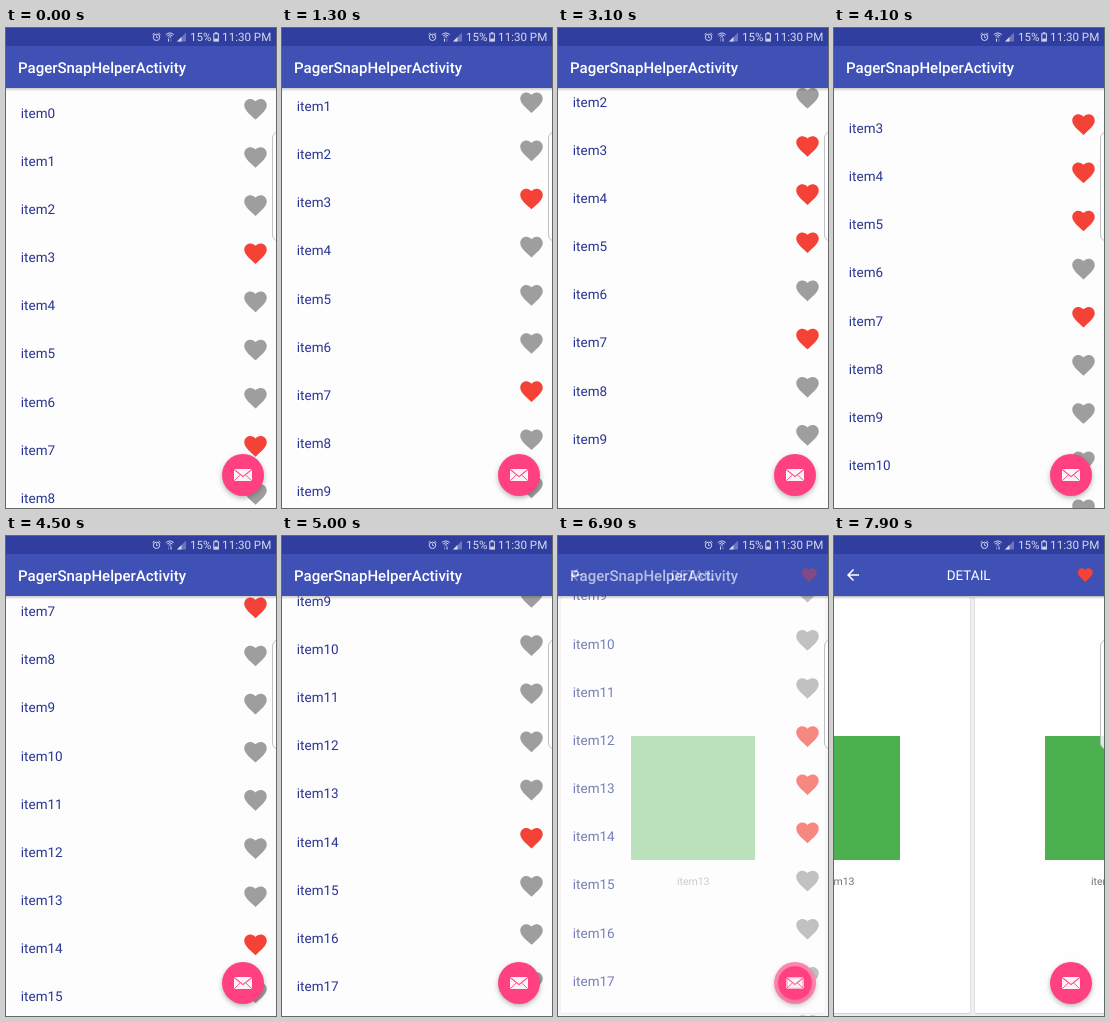
Animation, 270 px wide and 480 px high, one loop 8000 ms. Source, as an HTML page with a canvas:

```html
<!DOCTYPE html>
<html lang="en">
<head>
<meta charset="utf-8">
<title>Pager list</title>
<style>
  html, body { margin: 0; width: 100%; height: 100%; overflow: hidden; background: #fdfdfd; }
  canvas { position: absolute; left: 0; top: 0; width: 100vw; height: 100vh; }
</style>
</head>
<body>
<canvas id="list"></canvas>
<canvas id="detail"></canvas>
<script>
const W = 270, H = 480, LOOP = 8000, STEP = 100;
const ROW = 48.15, HEADER = 60, PAGE = 269;
const PRIMARY = '#3f51b5', DARK = '#303f9f', PINK = '#ff4081';
const RED = '#f44336', GRAY = '#9e9e9e', GREEN = '#4caf50', PAPER = '#fdfdfd';
const HEART = new Path2D('M12 21.35l-1.45-1.32C5.4 15.36 2 12.28 2 8.5 2 5.42 4.42 3 7.5 3c1.74 0 3.41.81 4.5 2.09C13.09 3.81 14.76 3 16.5 3 19.58 3 22 5.42 22 8.5c0 3.78-3.4 6.86-8.55 11.54z');
const ARROW = new Path2D('M20 11H7.83l5.59-5.59L12 4l-8 8 8 8 1.41-1.41L7.83 13H20z');

// Item index -> time it becomes a favourite
const liked = { 3: 0, 7: 0, 14: 0, 5: 2400, 4: 3000, 12: 5700, 13: 6100 };
const wifiFlips = [1500, 3300, 4300, 6600, 7600];

const clamp = v => Math.max(0, Math.min(1, v));
const ramp = (t, from, to) => clamp((t - from) / (to - from));
const easeOut = (u, p) => 1 - Math.pow(1 - u, p);
const easeInOut = u => u * u * (3 - 2 * u);

function layer(id) {
  const canvas = document.getElementById(id);
  const dpr = window.devicePixelRatio || 1;
  canvas.width = Math.round((innerWidth || W) * dpr);
  canvas.height = Math.round((innerHeight || H) * dpr);
  const c = canvas.getContext('2d');
  c.scale(canvas.width / W, canvas.height / H);
  c.textRendering = 'geometricPrecision';
  return c;
}

function text(c, str, x, y, size, color, align = 'left', weight = 400) {
  c.font = `${weight} ${size}px Roboto, sans-serif`;
  c.textAlign = align;
  c.fillStyle = color;
  c.fillText(str, x, y);
}

function icon(c, path, x, y, scale, color) {
  c.save();
  c.translate(x, y);
  c.scale(scale, scale);
  c.fillStyle = color;
  c.fill(path);
  c.restore();
}

function rect(c, x, y, w, h, color) {
  c.fillStyle = color;
  c.fillRect(x, y, w, h);
}

function pill(c, x, y, w, h, r) {
  c.beginPath();
  c.roundRect(x, y, w, h, r);
}

function line(c, points, color, width) {
  c.beginPath();
  points.forEach(([x, y]) => c.lineTo(x, y));
  c.strokeStyle = color;
  c.lineWidth = width;
  c.stroke();
}

function shadow(c, color, blur, dy) {
  c.shadowColor = color;
  c.shadowBlur = blur * c.canvas.width / W;
  c.shadowOffsetY = dy * c.canvas.height / H;
}

function statusBar(c, t) {
  const ink = '#d6d9ec', dim = '#6a75bb';
  rect(c, 0, 0, W, 18, DARK);

  c.strokeStyle = ink;
  c.lineWidth = 1;
  c.beginPath();
  c.arc(150.5, 9.3, 3.2, 0, Math.PI * 2);
  c.stroke();
  line(c, [[150.5, 7.3], [150.5, 9.5], [152, 9.5]], ink, .8);
  line(c, [[146.6, 6.6], [148.4, 5]], ink, 1);
  line(c, [[152.6, 5], [154.4, 6.6]], ink, 1);

  for (const r of [1.8, 3.7, 5.6]) {
    c.beginPath();
    c.arc(163.8, 10.6, r, -Math.PI * .75, -Math.PI * .25);
    c.lineWidth = 1;
    c.stroke();
  }
  const busy = wifiFlips.filter(f => t >= f).length % 2;
  line(c, [[162.5, 10.6], [162.5, 13.6]], busy ? dim : ink, 1.1);
  line(c, [[165, 10.6], [165, 13.6]], busy ? ink : dim, 1.1);

  for (const [x, color] of [[180, dim], [175.5, ink]]) {
    c.beginPath();
    c.moveTo(171, 13.5);
    c.lineTo(x, 13.5);
    c.lineTo(x, 13.5 - (x - 171));
    c.fillStyle = color;
    c.fill();
  }

  text(c, '15%', 184, 13.2, 11.5, ink);
  rect(c, 208.8, 4.3, 2.6, 1.2, ink);
  c.strokeStyle = ink;
  c.lineWidth = 1;
  c.strokeRect(207.8, 5.8, 4.6, 7.3);
  rect(c, 208.3, 10.6, 3.6, 2.4, ink);
  text(c, '11:30 PM', 265.3, 13.2, 11.6, ink, 'right');
}

function header(c, t) {
  const g = c.createLinearGradient(0, HEADER, 0, HEADER + 3.5);
  g.addColorStop(0, 'rgba(0,0,0,.2)');
  g.addColorStop(1, 'rgba(0,0,0,0)');
  rect(c, 0, HEADER, W, 3.5, g);
  rect(c, 0, 18, W, HEADER - 18, PRIMARY);
  statusBar(c, t);
}

function edgeHandle(c) {
  pill(c, 266.5, 104, 12, 109, 6);
  c.fillStyle = 'rgba(255,255,255,.8)';
  c.fill();
  c.strokeStyle = '#b9b9c0';
  c.lineWidth = .9;
  c.stroke();
}

function mailButton(c, scale = 1) {
  c.save();
  c.translate(237, 447);
  c.scale(scale, scale);
  c.save();
  shadow(c, 'rgba(0,0,0,.28)', 5, 2);
  c.beginPath();
  c.arc(0, 0, 21, 0, Math.PI * 2);
  c.fillStyle = PINK;
  c.fill();
  c.restore();

  pill(c, -9, -6, 18, 12, 1);
  c.fillStyle = '#fbf3f6';
  c.fill();
  line(c, [[-9, -5.6], [0, 1.6], [9, -5.6]], PINK, 1.2);
  line(c, [[-8.6, 5.6], [-2.8, 0]], PINK, .9);
  line(c, [[8.6, 5.6], [2.8, 0]], PINK, .9);
  c.restore();
}

function scrollAt(t) {
  return 107.3 * easeOut(ramp(t, 1150, 1650), 2) +
         351.2 * easeOut(ramp(t, 4070, 5190), 2.36);
}

function spinner(c, t, y) {
  const cycles = (t - 1400) / 1333 + 4;
  const k = Math.floor(cycles), u = cycles - k;
  const head = .75 * easeInOut(clamp(2 * u));
  const tail = .75 * easeInOut(clamp(2 * u - 1));
  const base = (k - 4) * .75 + (cycles - 4) * .25 - .335;
  c.beginPath();
  c.arc(135, y, 18, (base + tail) * Math.PI * 2, (base + head + .02) * Math.PI * 2);
  c.strokeStyle = PINK;
  c.lineWidth = 3;
  c.stroke();
}

function toast(c, t) {
  const alpha = ramp(t, 1300, 1700) * (1 - ramp(t, 2600, 3000));
  if (!alpha) return;
  c.save();
  c.globalAlpha = alpha;
  pill(c, 82, 399, 106, 33, 16.5);
  c.fillStyle = '#636363';
  c.fill();
  text(c, 'Requesting1...', 135, 420, 10.8, '#f4f4f4', 'center');
  c.restore();
}

function drawList(c, t) {
  rect(c, 0, 0, W, H, PAPER);
  const scroll = scrollAt(t);
  const loaded = t >= 3000;
  const count = loaded ? 20 : 10;

  for (let i = 0; i < count; i++) {
    const y = 85 + i * ROW - scroll;
    if (y < 30 || y > H + 20) continue;
    c.globalAlpha = i < 10 ? 1 : ramp(t, 3100, 3600);
    text(c, 'item' + i, 14.8, y + 4.6, 13.5, '#283593');
    icon(c, HEART, 236, y - 17.4, 1.125, t >= liked[i] ? RED : GRAY);
  }
  c.globalAlpha = 1;

  if (!loaded) spinner(c, t, 457 + 107.3 - scroll);
  const glow = ramp(t, 1400, 1600) * (1 - ramp(t, 1700, 2400));
  if (glow) {
    c.beginPath();
    c.ellipse(135, 492, 190, 23, 0, 0, Math.PI * 2);
    c.fillStyle = `rgba(90,90,90,${.14 * glow})`;
    c.fill();
  }

  header(c, t);
  text(c, 'PagerSnapHelperActivity', 12, 45, 15, '#fff', 'left', 500);
  edgeHandle(c);
  mailButton(c);
  toast(c, t);
}

function card(c, x, label) {
  c.save();
  shadow(c, 'rgba(0,0,0,.22)', 2, .5);
  pill(c, x + 3, 61, 264, 416, 1.5);
  c.fillStyle = '#fefefe';
  c.fill();
  c.restore();
  rect(c, x + 73, 200, 124, 124, GREEN);
  text(c, label, x + 135.2, 348.6, 10.5, '#757575', 'center');
}

function drawDetail(c, t) {
  rect(c, 0, 0, W, H, '#f0f0f0');
  const shift = 131 * Math.pow(ramp(t, 7700, 7900), 1.4);
  card(c, -shift, 'item13');
  if (shift) card(c, PAGE - shift, 'item14');
  header(c, t);
  icon(c, ARROW, 10, 30, .75, '#fff');
  text(c, 'DETAIL', 134.6, 44, 13.5, '#fff', 'center');
  icon(c, HEART, 242.3, 29.9, .75, RED);
  edgeHandle(c);
  mailButton(c, .7 + .3 * ramp(t, 6850, 7000));
}

const list = layer('list'), detail = layer('detail');

function frame(now) {
  const t = Math.floor(now % LOOP / STEP) * STEP;
  const fade = easeOut(ramp(t, 6850, 7200), 3);
  detail.canvas.style.opacity = fade;
  if (fade < 1) drawList(list, t);
  if (fade > 0) drawDetail(detail, t);
  requestAnimationFrame(frame);
}
frame(performance.now());
</script>
</body>
</html>
```
